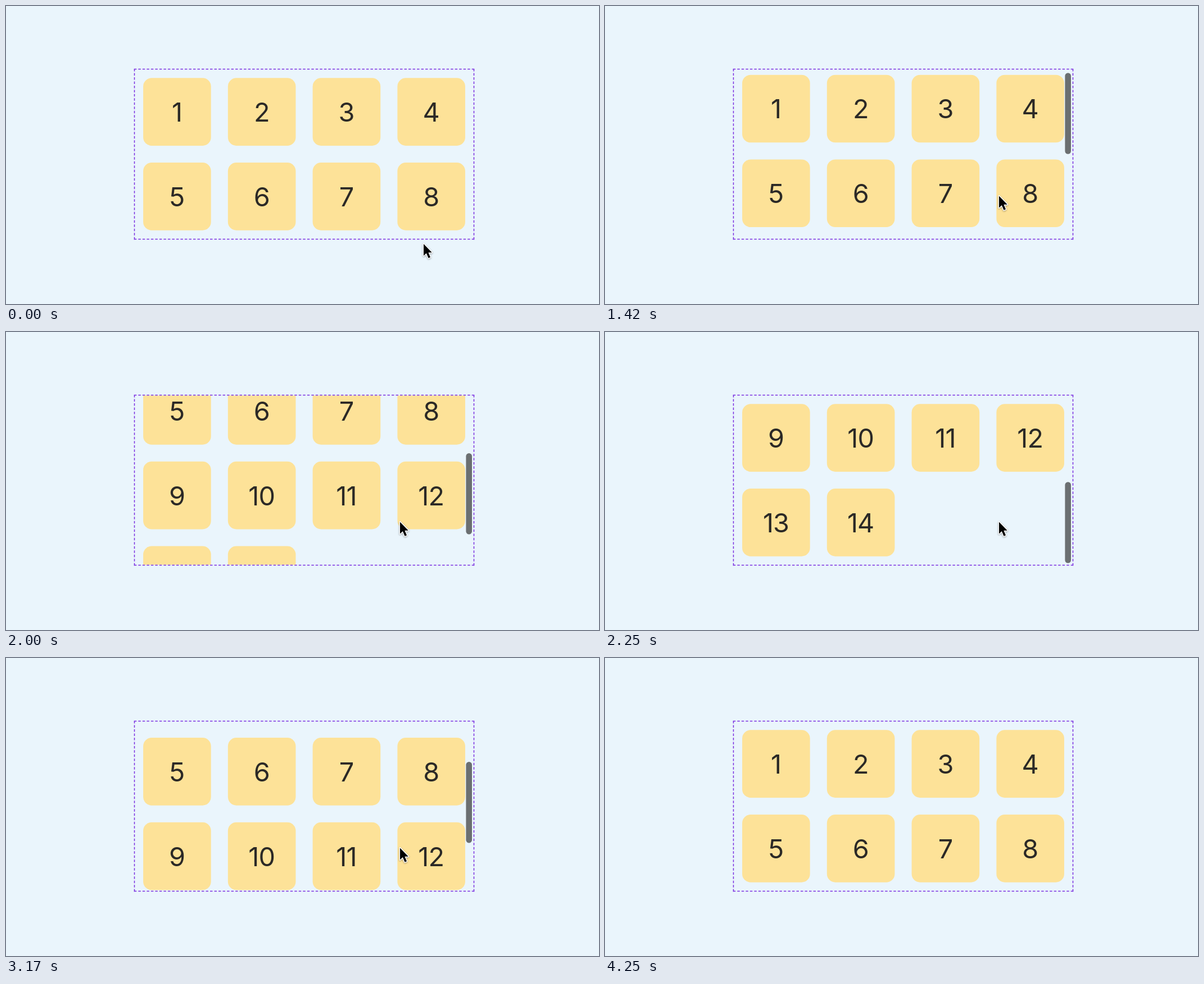
An HTML page that plays this animation: 1055x531 px, repeating every 4960 ms.

```html
<!DOCTYPE html>
<html lang="en">
<head>
<meta charset="utf-8">
<title>Scrolling card grid</title>
<style>
  html, body { margin: 0; width: 100%; height: 100%; overflow: hidden; background: #eaf5fc; }
  svg { display: block; width: 1055px; height: 531px; }
  text { font: 400 46.8px Inter, "Liberation Sans", sans-serif; letter-spacing: -1px; fill: #2b2926; text-anchor: middle; }
  #arrow { filter: drop-shadow(0 1.5px 1.5px rgba(0, 0, 0, .35)); }
</style>
</head>
<body>
<svg viewBox="0 0 1055 531">
  <clipPath id="view"><rect x="229" y="113.3" width="603" height="301.5"/></clipPath>
  <g clip-path="url(#view)">
    <g id="cards"></g>
    <rect id="bar" x="818.4" width="10.6" height="144.6" rx="5.3" fill="#6b6f71"/>
  </g>
  <g id="frame" fill="none" stroke="#7a2ee0" stroke-width="1.5"></g>
  <g id="cursor">
    <path id="arrow" d="M0 0V21L4.8 16.6L8.6 25.3L12 23.8L8.4 15.3H14.8Z"
      stroke="#fff" stroke-width="2.8" stroke-linejoin="round" paint-order="stroke"/>
  </g>
</svg>
<script>
const LOOP = 4960, FPS = 24;
const UNIT = 1.5075, CARD = 80 * UNIT, PITCH = 100 * UNIT, MAX = 200 * UNIT;
const LEFT = 244.1, TOP = 128.3;
const $ = id => document.getElementById(id);

function add(parent, tag, attrs, label = "") {
  const el = document.createElementNS("http://www.w3.org/2000/svg", tag);
  for (const key in attrs) el.setAttribute(key, attrs[key]);
  el.textContent = label;
  parent.appendChild(el);
}

for (let i = 0; i < 14; i++) {
  const x = LEFT + (i % 4) * PITCH, y = TOP + Math.floor(i / 4) * PITCH;
  add($("cards"), "rect", { x, y, width: CARD, height: CARD, rx: 15, fill: "#fde298" });
  add($("cards"), "text", { x: x + CARD / 2 - 0.5, y: y + 77.8 }, i + 1);
}

// Each side starts and ends with a full dash.
function dashedSide(d, length) {
  const dash = 4.5, count = Math.round((length + 3) / 7.5);
  const gap = (length - count * dash) / (count - 1);
  add($("frame"), "path", { d, "stroke-dasharray": dash + " " + gap });
}
for (const y of [112.6, 415.5]) dashedSide(`M227.8 ${y}h605.4`, 605.4);
for (const x of [228.5, 832.5]) dashedSide(`M${x} 111.9v304.3`, 304.3);

// Scroll keys: step, offset, speed per step
const scrollKeys = [
  [31, 0, 0], [40, 59, 14.5], [48, 199, 19], [54, MAX, 0],
  [63, MAX, 0], [68, 266, -13], [76, 137, -18], [84, 0, 0]
];

function scrollAt(k) {
  if (k <= 31 || k >= 84) return 0;
  const i = scrollKeys.findIndex(key => key[0] > k);
  const [a, p, v] = scrollKeys[i - 1], [b, q, w] = scrollKeys[i];
  const span = b - a, u = (k - a) / span, u2 = u * u, u3 = u2 * u;
  return p * (2 * u3 - 3 * u2 + 1) + q * (3 * u2 - 2 * u3)
    + span * (v * (u3 - 2 * u2 + u) + w * (u3 - u2));
}

const progress = (k, a, b) => Math.min(1, Math.max(0, (k - a) / (b - a)));
const smooth = u => u * u * (3 - 2 * u);

function render(ms) {
  const k = Math.floor((ms % LOOP + 5) * FPS / 1000);

  const scroll = scrollAt(k);
  $("cards").setAttribute("transform", `translate(0 ${-scroll})`);
  $("bar").setAttribute("y", 116.4 + scroll / 2);
  $("bar").setAttribute("opacity", k < 32 ? 0 : 1 - progress(k, 89, 96));

  const enter = smooth(progress(k, 13, 20)), leave = progress(k, 89, 95) ** 1.5;
  const x = 743 - 42 * enter + 40 * leave, y = 424 - 85.5 * enter - 306 * leave;
  $("cursor").setAttribute("transform", `translate(${x} ${y})`);
  $("cursor").setAttribute("visibility", k > 95 ? "hidden" : "visible");
}

const start = performance.now();
function tick() {
  render(performance.now() - start);
  requestAnimationFrame(tick);
}
tick();
</script>
</body>
</html>
```
